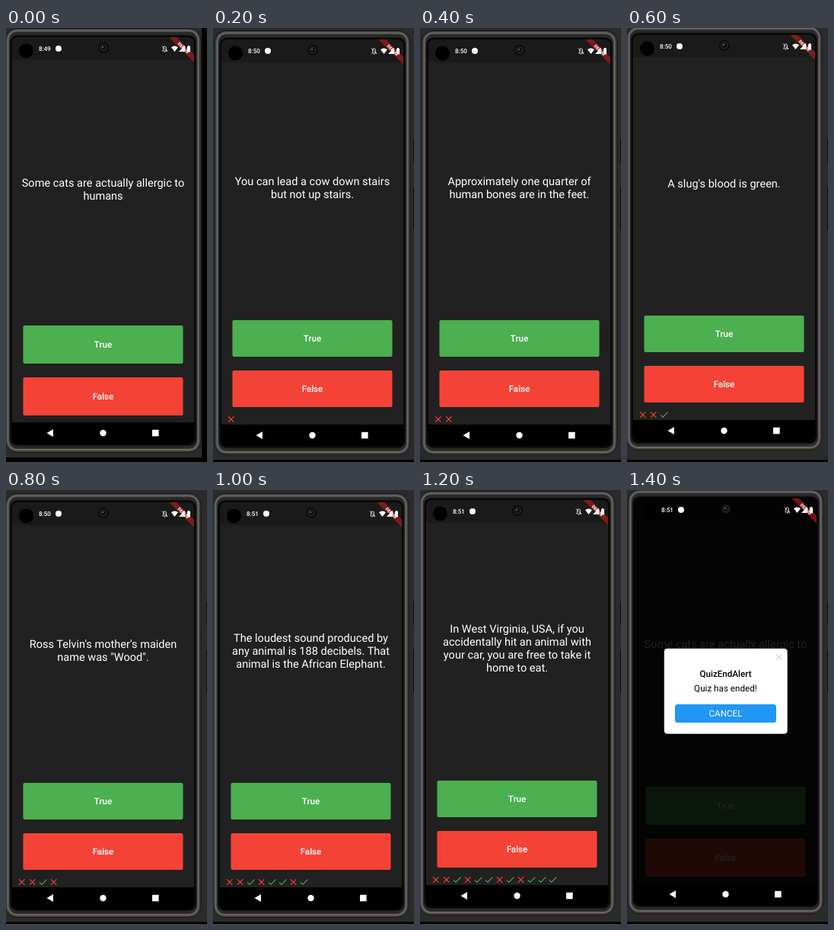
Write an HTML page that moves like this. It is 264 px wide and 569 px high and loops after 1.6 s.

```html
<!DOCTYPE html>
<html lang="en">
<head>
<meta charset="utf-8">
<title>Quiz</title>
<style>
html, body { margin: 0; width: 100%; height: 100%; overflow: hidden; background: #000; }
svg { display: block; width: 100%; height: 100%; }
text { font-family: Roboto, "Noto Sans", sans-serif; text-anchor: middle; text-rendering: geometricPrecision; }
</style>
</head>
<body>
<svg id="stage" viewBox="0 0 264 569"></svg>
<script>
const STEP = 200;
const DP = 239 / 411; // screen pixels per layout unit
const ANSWERS = 'xxvxvvxvxvvv';
const CATS = ['Some cats are actually allergic to', 'humans'];

// Each step: phone offset, clock, number of answers given, question lines
const steps = [
  { dx: 0, dy: 0, clock: '8:49', done: 0, lines: CATS, first: true },
  { dx: 3, dy: 3, clock: '8:50', done: 1, lines: ['You can lead a cow down stairs', 'but not up stairs.'] },
  { dx: 3, dy: 3, clock: '8:50', done: 2, lines: ['Approximately one quarter of', 'human bones are in the feet.'] },
  { dx: 0, dy: -3, clock: '8:50', done: 3, lines: ["A slug's blood is green."] },
  { dx: 0, dy: 4, clock: '8:50', done: 4, lines: ["Ross Telvin's mother's maiden", 'name was "Wood".'] },
  { dx: 1, dy: 4, clock: '8:51', done: 8, lines: ['The loudest sound produced by', 'any animal is 188 decibels. That', 'animal is the African Elephant.'] },
  { dx: 0, dy: 1, clock: '8:51', done: 12, lines: ['In West Virginia, USA, if you', 'accidentally hit an animal with', 'your car, you are free to take it', 'home to eat.'] },
  { dx: 2, dy: -1, clock: '8:51', done: 0, lines: CATS, alert: true },
];

const rect = (x, y, w, h, fill, rx = 0, more = '') =>
  `<rect x="${x}" y="${y}" width="${w}" height="${h}" rx="${rx}" fill="${fill}" ${more}/>`;
const circle = (x, y, r, fill) => `<circle cx="${x}" cy="${y}" r="${r}" fill="${fill}"/>`;
const path = (d, fill, more = '') => `<path d="${d}" fill="${fill}" ${more}/>`;
const text = (s, x, y, size, fill, weight = 400) =>
  `<text x="${x}" y="${y}" font-size="${size}" fill="${fill}" font-weight="${weight}">${s}</text>`;

const backdrop = first => first
  ? rect(0, 0, 257, 563, '#2b2b2b')
  : rect(0, 0, 264, 566, '#2b2b2b') + rect(263, 146, 1, 31, '#0c0c0c') + rect(263, 209, 1, 56, '#0c0c0c');

const shell =
  rect(-1, .5, 257, 556, '#3c3c3b', 15, 'stroke="#161616"') +
  rect(2.5, 3.5, 250, 549.5, 'none', 12, 'stroke="#686866" stroke-width="2"') +
  rect(4, 5.5, 247, 545.5, '#282828', 11) +
  rect(5.5, 9.5, 244, 538, '#070707', 9);

function mark(kind, i) {
  const place = `transform="translate(${20.8 + i * 24 * DP - 12 * DP} ${510 - 12 * DP}) scale(${DP})"`;
  return kind === 'x'
    ? path('M5.7 5.7L18.3 18.3M18.3 5.7L5.7 18.3', 'none', place + ' stroke="#f44336" stroke-width="2"')
    : path('M9 16.17L4.83 12l-1.42 1.41L9 19 21 7l-1.41-1.41z', '#4caf50', place);
}

function app({ done, lines }) {
  const part = (done ? 461 : 475) / 7;
  const top = 42 + part * 2.5 - lines.length * 8.53 + 13.5;
  const button = (label, fill, n) => {
    const y = Math.round(42 + part * (4 + n) + 8.7), h = Math.round(part - 17.45);
    return rect(22.5, y, 210, h, fill, 2) + text(label, 127.5, y + h / 2 + 4, 11.63, '#fff', 500);
  };
  return rect(8, 12, 239, 533, '#212121', 8) +
    path('M8 42V20a8 8 0 0 1 8-8H239a8 8 0 0 1 8 8V42z', '#1a1a1a') +
    lines.map((s, i) => text(s, 127.5, top + i * 17.05, 14.55, '#fff')).join('') +
    button('True', '#4caf50', 1) + button('False', '#f44336', 2) +
    [...ANSWERS.slice(0, done)].map(mark).join('') +
    path('M8 517H247V537a8 8 0 0 1-8 8H16a8 8 0 0 1-8-8z', '#000') +
    circle(26.5, 30, 9.6, '#000');
}

const dialog =
  rect(8, 12, 239, 533, '#000', 8, 'opacity=".87"') +
  rect(47, 209, 161.5, 111.5, '#fff', 4, 'stroke="#b9dcea" stroke-width=".5"') +
  path('M193.5 216l8 8m0-8l-8 8', 'none', 'stroke="#b4bcc4"') +
  text('QuizEndAlert', 127.5, 245.6, 11.63, '#000', 500) +
  text('Quiz has ended!', 127.5, 265.2, 11.7, '#000') +
  rect(61, 282, 133, 24, '#2196f3', 3.5) +
  text('CANCEL', 127.5, 298.1, 11.63, '#fff');

const banner =
  `<g clip-path="url(#screen)"><g transform="translate(247 12) rotate(45)">` +
  rect(-24, 28 * DP, 48, 12 * DP, '#b71c1c', 0, 'opacity=".63"') +
  text('DEBUG', 0, 34 * DP + 2, 5.6, '#fff', 900) + '</g></g>';

const icons =
  circle(69, 27, 4, '#fff') +
  path('M205.5 30h6l-1-1.5V26a2 2 0 0 0-4 0v2.5zM208 31.3h1.2M205 23.5l7 7.5', 'none', 'stroke="#fff" stroke-width=".8"') +
  path('M217 25.2q4.5-3.6 9 0L221.5 31z', '#fff') +
  path('M227 31l8-8v8z', '#fff') +
  path('M238 24h1v-1h2v1h1v7.5h-4z', '#fff') +
  path('M62 526v10l-8.5-5z', '#fff') +
  circle(127.5, 531, 4.2, '#fff') + rect(192, 526.7, 8.6, 8.6, '#fff', .5);

const lens = circle(128, 26, 7, '#0b0b0c') + circle(128, 26, 5, '#222328') +
  circle(128, 26, 3.2, '#101116') + circle(127, 25, 1, '#777a85');

const draw = step =>
  '<clipPath id="screen">' + rect(8, 12, 239, 533, '#000', 8) + '</clipPath>' +
  backdrop(step.first) +
  `<g transform="translate(${step.dx} ${step.dy})">` +
  shell + app(step) + (step.alert ? dialog : '') + banner + lens +
  text(step.clock, 51, 30, 8.1, '#fff', 500) + icons + '</g>';

const stage = document.getElementById('stage');
let shown = -1;
function tick() {
  const now = Math.floor(performance.now() / STEP) % steps.length;
  if (now !== shown) stage.innerHTML = draw(steps[shown = now]);
  requestAnimationFrame(tick);
}
tick();
</script>
</body>
</html>
```
